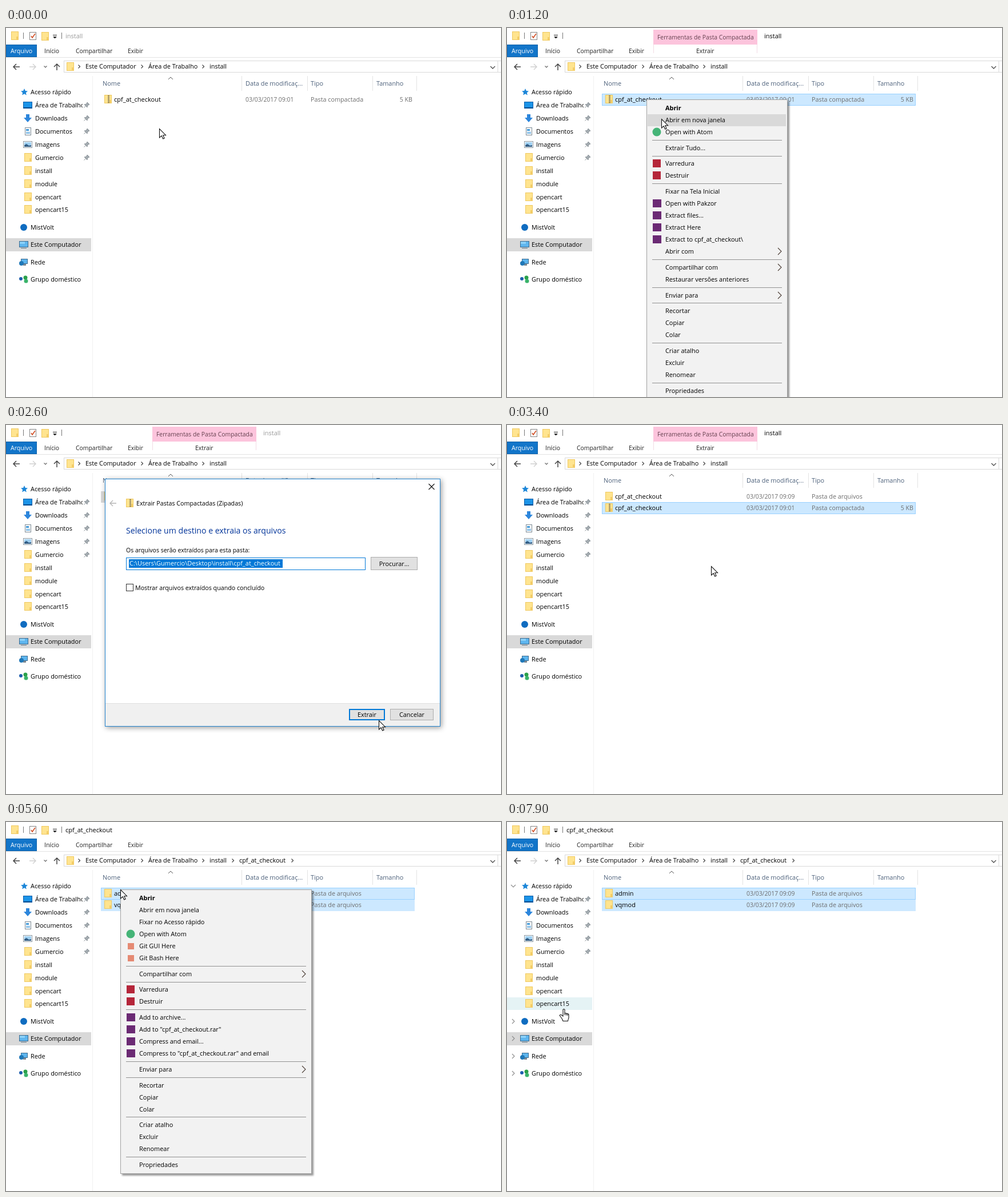
Recreate the animation shown at these times as an HTML page. Size 866 by 646 pixels, loop 8000 ms.

```html
<!DOCTYPE html>
<html lang="pt-BR">
<head>
<meta charset="utf-8">
<style>
  html, body { margin: 0; width: 100%; height: 100%; overflow: hidden; background: #fff; }
  svg { display: block; width: 866px; height: 646px; font-family: "Open Sans", "Noto Sans", sans-serif; }
  rect { shape-rendering: crispEdges; }
  text { white-space: pre; }
</style>
</head>
<body>
<svg id="stage" viewBox="0 0 866 646"></svg>
<script>
const LOOP = 8000, STEP = 100;
const stage = document.getElementById('stage');
const USER = 'Gumercio';

// Drawing helpers, all returning SVG markup
const rect = (x, y, w, h, fill, line) => line
  ? `<rect x="${x + .5}" y="${y + .5}" width="${w - 1}" height="${h - 1}" fill="${fill}" stroke="${line}"/>`
  : `<rect x="${x}" y="${y}" width="${w}" height="${h}" fill="${fill}"/>`;
const text = (x, y, s, fill = '#000', size = 10.9, more = '') =>
  `<text x="${x}" y="${y}" fill="${fill}" font-size="${size}" ${more}>${s}</text>`;
const path = (x, y, d, line, width = 1, fill = 'none') =>
  `<path transform="translate(${x} ${y})" d="${d}" fill="${fill}" stroke="${line}" stroke-width="${width}"/>`;
const dot = (x, y, r, fill) => `<circle cx="${x}" cy="${y}" r="${r}" fill="${fill}"/>`;
const shadow = (dx, blur, s) => `<g style="filter:drop-shadow(${dx}px ${dx}px ${blur}px #0006)">${s}</g>`;

const RIGHT = 'M-2 -3L1 0L-2 3', DOWN = 'M-4 -2L0 2L4 -2', UP = 'M-4 2L0 -2L4 2';
const BACK = 'M6 0H-5M0 -5L-5 0L0 5', FORWARD = 'M-6 0H5M0 -5L5 0L0 5';

const folder = (x, y) => rect(x, y, 13, 15, '#ffe48f', '#efc85f') + rect(x + 9, y + 9, 4, 6, '#f3cd68');
const zip = (x, y) => folder(x, y) +
  `<path d="M${x + 7.5} ${y + 1}v13" stroke="#6b6350" stroke-width="3" stroke-dasharray="1 1"/>`;

const icons = {
  star: y => path(32, y, 'M0 -6L1.8 -2L6 -1.6L2.8 1.2L3.8 5.6L0 3.3L-3.8 5.6L-2.8 1.2L-6 -1.6L-1.8 -2Z', 'none', 0, '#1c86d8'),
  desk: y => rect(30, y - 6, 16, 12, '#1b94e8', '#0a5ca8') + rect(31, y + 4, 14, 1, '#0a3f78'),
  down: y => path(38, y, 'M-3 -7H3V-1H7L0 7L-7 -1H-3Z', 'none', 0, '#2c86dc'),
  doc: y => rect(33, y - 7, 11, 14, '#fff', '#7d8a94') + rect(35, y - 4, 5, 3, '#3f98d8') +
    rect(35, y + 1, 7, 1, '#3f98d8') + rect(35, y + 3, 7, 1, '#3f98d8'),
  image: y => rect(30, y - 6, 16, 12, '#fff', '#8b98a2') + rect(32, y - 4, 12, 8, '#9fd0f2') +
    path(32, y + 4, 'M0 0V-3L4 -5L8 -2L12 -3V0Z', 'none', 0, '#345f86'),
  folder: y => folder(32, y - 8),
  cloud: y => dot(31, y, 6, '#0f6cc0'),
  pc: y => rect(23, y - 6, 16, 11, '#5db5ee', '#3b6b90') + rect(24, y - 5, 9, 4, '#8bd0f8') + rect(26, y + 6, 10, 1, '#62788a'),
  net: y => rect(26, y - 6, 12, 9, '#5db5ee', '#3b6b90') + rect(30, y + 3, 5, 3, '#7d8a94') + dot(27, y + 2, 4, '#1f78b8'),
  group: y => dot(26, y - 1, 3, '#1e5fae') + dot(34, y - 3, 3.5, '#2aa04a') + dot(35, y + 3, 3.5, '#39b36a')
};

const sidebar = [
  ['star', 112, 'Acesso rápido'], ['desk', 135, 'Área de Trabalho', 1], ['down', 158, 'Downloads', 1],
  ['doc', 181, 'Documentos', 1], ['image', 204, 'Imagens', 1], ['folder', 227, USER, 1],
  ['folder', 250, 'install'], ['folder', 273, 'module'], ['folder', 296, 'opencart'], ['folder', 318, 'opencart15'],
  ['cloud', 349, 'MistVolt'], ['pc', 379, 'Este Computador'], ['net', 410, 'Rede'], ['group', 440, 'Grupo doméstico']
];

// Menu lines: icon letter or space, label, optional ">" for a submenu; "-" is a separator
const zipMenu = { x: 244, y: 125, w: 247, lines: [
  ' Abrir', ' Abrir em nova janela', 'aOpen with Atom', '-', ' Extrair Tudo...', '-', 'mVarredura', 'mDestruir', '-',
  ' Fixar na Tela Inicial', 'wOpen with Pakzor', 'wExtract files...', 'wExtract Here', 'wExtract to cpf_at_checkout\\',
  ' Abrir com>', '-', ' Compartilhar com>', ' Restaurar versões anteriores', '-', ' Enviar para>', '-',
  ' Recortar', ' Copiar', ' Colar', '-', ' Criar atalho', ' Excluir', ' Renomear', '-', ' Propriedades'] };
const dirMenu = { x: 200, y: 118, w: 335, lines: [
  ' Abrir', ' Abrir em nova janela', ' Fixar no Acesso rápido', 'aOpen with Atom', 'gGit GUI Here', 'gGit Bash Here', '-',
  ' Compartilhar com>', '-', 'mVarredura', 'mDestruir', '-', 'wAdd to archive...', 'wAdd to "cpf_at_checkout.rar"',
  'wCompress and email...', 'wCompress to "cpf_at_checkout.rar" and email', '-', ' Enviar para>', '-',
  ' Recortar', ' Copiar', ' Colar', '-', ' Criar atalho', ' Excluir', ' Renomear', '-', ' Propriedades'] };
const menuIcons = {
  a: (x, y) => dot(x, y, 7.5, '#45b477'),
  m: (x, y) => rect(x - 7, y - 7, 14, 14, '#b5263a'),
  w: (x, y) => rect(x - 7, y - 7, 15, 14, '#6b2a74'),
  g: (x, y) => rect(x - 5, y - 5, 11, 11, '#e58a73')
};

function drawMenu({ x, y, w, lines }, cursor) {
  let cy = y + 15, body = '', bold = 'font-weight="700"';
  for (const line of lines) {
    if (line === '-') {
      body += rect(x + 10, Math.round(cy - 7.2), w - 20, 1, '#919191');
      cy += 6.72;
      continue;
    }
    const row = Math.round(cy), icon = menuIcons[line[0]];
    if (cursor.x > x + 2 && Math.abs(cursor.y - 8 - cy) <= 10.5) body += rect(x + 2, row - 10, w - 5, 21, '#d9d9d9');
    if (icon) body += icon(x + 18, row);
    body += text(x + 33, row + 4, line.slice(1).replace('>', ''), '#000', 10.9, bold);
    if (line.endsWith('>')) body += path(x + w - 13, row, 'M-4 -6L2 0L-4 6', '#4a3c34', 1.1);
    bold = '';
    cy += 21;
  }
  return shadow(3, 1.5, rect(x, y, w, Math.round(cy - y - 5), '#f2f2f2', '#a0a0a0')) + body;
}

const button = (x, y, w, h, label, main) => rect(x, y, w, h, '#e1e1e1', main ? '#0078d7' : '#adadad') +
  (main ? rect(x + 1, y + 1, w - 2, h - 2, 'none', '#0078d7') : '') +
  text(x + w / 2, y + h / 2 + 4, label, '#000', 10.9, 'text-anchor="middle"');

const drawDialog = () => shadow(2, 5, rect(173, 94, 587, 434, '#fff', '#2384cf')) +
  rect(174, 488, 585, 39, '#f0f0f0') + rect(174, 487, 585, 1, '#dfdfdf') +
  path(744.5, 108, 'M-5 -5L5 5M5 -5L-5 5', '#111', 1.1) + path(187, 137, BACK, '#b5b5b5', 1.3) + zip(210, 129) +
  text(228, 141, 'Extrair Pastas Compactadas (Zipadas)', '#000', 10.7) +
  text(210, 190, 'Selecione um destino e extraia os arquivos', '#003399', 14.1) +
  text(210, 223, 'Os arquivos serão extraídos para esta pasta:', '#000', 10.5) +
  rect(210, 232, 419, 22, '#fff', '#0078d7') + rect(215, 235, 269, 15, '#0078d7') +
  text(216, 246, `C:\\Users\\${USER}\\Desktop\\install\\cpf_at_checkout`, '#fff', 11) +
  button(638, 231, 82, 23, 'Procurar...') + rect(210, 278, 13, 13, '#fff', '#333') +
  text(226, 289, 'Mostrar arquivos extraídos quando concluído', '#000', 10.7) +
  button(600, 497, 63, 20, 'Extrair', true) + button(672, 497, 76, 20, 'Cancelar');

// Pointer path: time, x, y
const track = [
  [0, 268, 176], [500, 256, 150], [900, 244, 125], [1000, 245, 126], [1200, 270, 159], [1700, 292, 212],
  [1900, 296, 216], [2600, 652, 517], [2700, 648, 512], [2800, 640, 505], [3400, 357, 247], [3600, 272, 200],
  [4100, 235, 128], [4300, 236, 132], [4700, 250, 190], [4800, 254, 197], [5100, 200, 118], [6200, 200, 118],
  [6600, 263, 378], [6900, 268, 483], [7100, 268, 483], [7900, 98, 327]
];
function pointer(t) {
  const i = track.findIndex(k => k[0] > t);
  if (i < 0) return { x: 98, y: 327 };
  const [t0, x0, y0] = track[i - 1], [t1, x1, y1] = track[i], p = (t - t0) / (t1 - t0);
  return { x: Math.round(x0 + (x1 - x0) * p), y: Math.round(y0 + (y1 - y0) * p) };
}
const drawPointer = ({ x, y }) => x < 150
  ? path(x, y, 'M0 1.5Q1.5 -.5 3 1.5V8Q4.5 6.7 5.5 8.5Q7 7.5 8 9Q10 8.5 10 11V16Q9 18 8.5 21.5H0Q-1 18 -3.5 15L-6 11.5Q-4.5 9 -2 11.5L0 13ZM3 8V11M5.5 8.5V11.5M8 9V12', '#111', 1.1, '#fff')
  : path(x + .5, y + .5, 'M0 0V15.5L3.6 12.2L6.2 17.6L8.6 16.5L6.2 11.2H11Z', '#111', 1.1, '#fff');

function drawFrame(active, tab, inside) {
  let s = folder(9, 6) + rect(30, 8, 1, 11, '#777') + rect(41, 7, 12, 14, '#fff', '#858585') +
    path(47, 14, 'M-3 0L-1 3L4 -4', '#d2522a', 1.7) + folder(62, 7) +
    rect(82, 12, 7, 1, '#222') + path(85.5, 15, 'M-3.5 0H3.5L0 3.5Z', 'none', 0, '#222') + rect(97, 8, 1, 11, '#777') +
    text(tab ? 450 : 104, 18, inside ? 'cpf_at_checkout' : 'install', active ? '#000' : '#999', 11) +
    rect(0, 51, 866, 1, '#e3e3e3') + rect(0, 29, 54, 22, '#1275c9', '#0f62a9') + text(8, 44, 'Arquivo', '#fff', 10.6) +
    text(67, 44, 'Início', '#222', 10.5) + text(122, 44, 'Compartilhar', '#222', 10.4) + text(213, 44, 'Exibir', '#222', 10.4);
  if (tab) s += rect(256, 3, 182, 26, '#fcc4dc') + text(263, 20, 'Ferramentas de Pasta Compactada', '#65404f', 10.35) +
    rect(256, 29, 1, 15, '#f3dbe5') + rect(437, 29, 1, 15, '#f3dbe5') + text(331, 44, 'Extrair', '#222', 10.4);

  s += path(18, 68, BACK, '#444', 1.5) + path(47, 68, FORWARD, '#d0d0d0', 1.4) +
    path(69, 67.5, 'M-2.5 -1L0 1.5L2.5 -1', '#666', 1.2) + path(89, 68, 'M0 6V-5M-5 0L0 -5L5 0', '#444', 1.5) +
    rect(101, 57, 780, 21, '#fff', '#d9d9d9') + rect(860, 57, 1, 21, '#d9d9d9') +
    path(851.5, 69, DOWN, '#555', 1.4) + folder(106, 60);
  const crumbs = [[139, 'Este Computador'], [249, 'Área de Trabalho'], [356, 'install']];
  const marks = [128, 238, 345];
  if (inside) { crumbs.push([408, 'cpf_at_checkout']); marks.push(397, 501); }
  for (const [x, label] of crumbs) s += text(x, 71, label);
  for (const x of marks) s += path(x + .5, 67.5, RIGHT, '#444', 1.2);

  s += rect(151, 84, 1, 562, '#f1f1f1') + path(288, 88, UP, '#555');
  for (const x of [412, 527, 641, 718]) s += rect(x, 84, 1, 26, '#e3e3e3');
  for (const [x, label] of [[169, 'Nome'], [419, 'Data de modificaç...'], [533, 'Tipo'], [648, 'Tamanho']])
    s += text(x, 101, label, '#4c607a');
  return s;
}

function drawSidebar(cursor) {
  const over = cursor.x < 150;
  let s = '';
  for (const [icon, y, label, pinned] of sidebar) {
    if (icon === 'pc') s += rect(0, 368, 149, 23, '#d9d9d9');
    else if (over && Math.abs(cursor.y - y) < 11.5) s += rect(0, y - 11, 149, 22, '#e5f3f5');
    const nested = y > 112 && y < 330;
    s += icons[icon](y) + text(nested ? 51 : 43, y + 4, label);
    if (pinned) s += rect(134, y - 8, 14, 16, '#fff') +
      path(141, y, 'M1 -5L5 -1L3.5 -.5L1.5 1.5L1 4L-4 -1L-1.5 -1.5L.5 -3.5ZM-1.5 1.5L-4.5 4.5', '#8a9298', 1, '#a3abb0');
    if (over && !nested) s += path(11, y, y === 112 ? DOWN : 'M-2 -4L2 0L-2 4', '#8a8a8a', 1.1);
  }
  return s;
}

function drawFiles(files, selected, active, cursor, canHover) {
  return files.map(([name, date, size], i) => {
    const y = 115 + 20 * i, mid = y + 14;
    const hover = canHover && cursor.x > 166 && cursor.x < 715 && cursor.y >= y && cursor.y < y + 20;
    const focused = active && i === selected[0];
    let s = '';
    if (focused) s += rect(166, y, 549, 21, '#cce8ff', '#99d1ff');
    else if (selected.includes(i)) s += rect(166, y + 1, 549, 20, active ? '#cce8ff' : '#d9d9d9');
    else if (hover) s += rect(166, y + 1, 549, 20, '#e5f3ff');
    return s + (size ? zip : folder)(172, y + 2) + text(189, mid, name, '#000', 11) +
      text(419, mid, '03/03/2017 ' + date, '#6d6d6d', 10.4) +
      text(533, mid, size ? 'Pasta compactada' : 'Pasta de arquivos', '#6d6d6d', 10.8) +
      text(711, mid, size || '', '#6d6d6d', 10.6, 'text-anchor="end"');
  }).join('');
}

function scene(t) {
  const within = (a, b) => t >= a && t < b;
  const cursor = pointer(t), inside = t >= 4300, dialog = within(1900, 2800);
  const active = t >= 900 && !dialog;
  const menu = within(1000, 1900) ? zipMenu : within(5600, 7200) ? dirMenu : null;
  const archive = ['cpf_at_checkout', '09:01', '5 KB'];
  const files = inside ? [['admin', '09:09'], ['vqmod', '09:09']]
    : t < 3000 ? [archive] : [['cpf_at_checkout', '09:09'], archive];
  const selected = inside ? (t < 5000 ? [] : [0, 1])
    : t < 900 ? [] : t < 3000 || t >= 4100 ? [0] : [1];
  return drawFrame(active, within(900, 4100), inside) + drawSidebar(cursor) +
    drawFiles(files, selected, active, cursor, !menu && !dialog) +
    (menu ? drawMenu(menu, cursor) : '') + (dialog ? drawDialog() : '') + drawPointer(cursor);
}

let shown = -1;
function tick() {
  const t = Math.floor(performance.now() % LOOP / STEP) * STEP;
  if (t !== shown) stage.innerHTML = scene(shown = t);
  requestAnimationFrame(tick);
}
tick();
</script>
</body>
</html>
```
